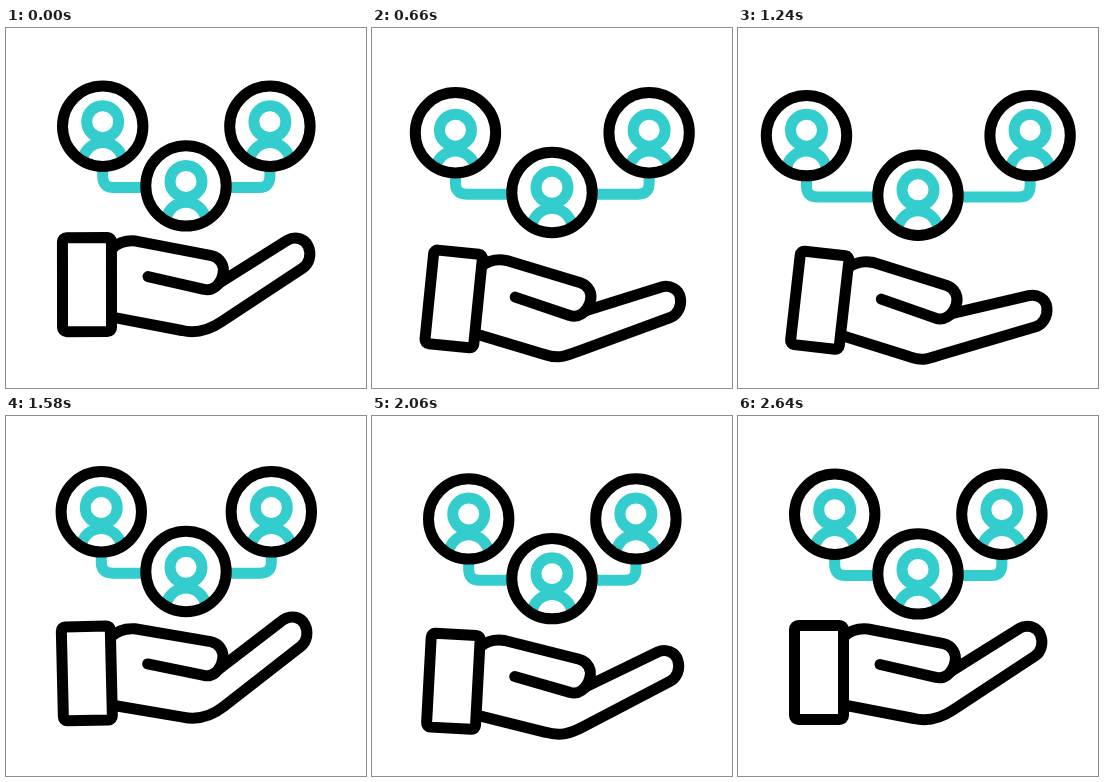
An HTML page for the animation above (3040 ms loop, 360 by 360 pixels).

```html
<!DOCTYPE html>
<html lang="en">
<head>
<meta charset="utf-8">
<title>Hand holding a network</title>
<style>
  html, body { margin: 0; width: 100%; height: 100%; overflow: hidden; background: #fff; }
  svg { display: block; width: 100%; height: 100%; }
  .ink, .teal { fill: none; stroke-width: 11; stroke-linecap: round; stroke-linejoin: round; }
  .ink { stroke: #000; }
  .teal { stroke: #33cdcd; }
</style>
</head>
<body>
<svg viewBox="0 0 360 360">
  <defs>
    <clipPath id="disc"><circle r="40"/></clipPath>
    <g id="person" class="teal">
      <circle r="16"/>
      <path d="M-22 60L-19.8 38A20 20 0 0 1 19.8 38L22 60"/>
    </g>
  </defs>
  <path id="links" class="teal" style="stroke-linecap:butt"/>
  <g id="nodes"></g>
  <g id="hand" class="ink">
    <rect x="56.5" y="209.5" width="49" height="94" rx="4"/>
    <path d="M106 220.5C112 215 120 212 130 213L205.5 227.7C214 229.5 219 237.5 217 246C214.5 257.5 206 263.5 198 261.3L142 248.5"/>
    <path id="finger"/>
  </g>
</svg>
<script>
const LOOP = 3040;
const $ = id => document.getElementById(id);

// The swing goes rest, up, down, hold, up, half down, rest.
const times = [0, 270, 1150, 1200, 1640, 2150, 2640];
const smooth = u => u * u * (3 - 2 * u);

// One quantity over the swing; the first fall is quickened by snap.
function swing(up, down, up2, down2, snap = 1.95) {
  const poses = [0, up, down, down, up2, down2, 0];
  return t => {
    if (t >= times[6]) return 0;
    const i = times.findIndex(end => end > t) - 1;
    let u = (t - times[i]) / (times[i + 1] - times[i]);
    if (i === 1) u = 1 - (1 - u) ** snap;
    return poses[i] + (poses[i + 1] - poses[i]) * smooth(u);
  };
}

const lift = swing(-3.3, 9.7, -3, 5.4);
const spread = swing(-6, 28.9, 0, 0, 1.3);
const tilt = swing(-1, 7.2, -1.4, 3.2);
const drop = swing(1.8, 17.2, 0.8, 9);
const bend = swing(-3, 10.8, -4, 3.2);
const HAND_LEAD = 40;

// A short dip of a head around the time mid.
const nod = (t, mid, depth) =>
  Math.abs(t - mid) < 160 ? depth * Math.cos((t - mid) / 320 * Math.PI) ** 2 : 0;

$('nodes').innerHTML = `<g>
  <g clip-path="url(#disc)"><use href="#person"/></g>
  <circle class="ink" r="40.2"/></g>`.repeat(3);
const nodes = [...$('nodes').children];

function place(node, x, y, head) {
  node.setAttribute('transform', `translate(${x} ${y})`);
  node.querySelector('use').setAttribute('y', head);
}

function fingerPath(deg) {
  const a = deg * Math.PI / 180, c = Math.cos(a), s = Math.sin(a);
  const p = (x, y) => {
    const u = x - 196, v = y - 257;
    return `${196 + u * c - v * s} ${257 + u * s + v * c} `;
  };
  return `M213.5 255L${p(281.5, 212.3)}`
    + `C${p(289, 208)}${p(299, 210.5)}${p(302.3, 218.5)}`
    + `C${p(306, 227)}${p(303, 236)}${p(297, 240)}`
    + `L${p(215, 294)}C${p(203, 302)}191 306 176 302.5L106 289`;
}

function draw(t) {
  const y = lift(t), side = 98.2 + y, mid = 157.9 + y, bar = mid + 1.7;
  const gap = 83.6 + spread(t), head = -4.5 - 0.1 * y;
  const sideHead = head + nod(t, 660, 2.5);
  place(nodes[0], 180.3 - gap, side, sideHead);
  place(nodes[1], 180.3 + gap, side, sideHead);
  place(nodes[2], 180, mid, head + nod(t, 340, 4.4));

  const link = d => {
    const x = 180.3 + d * gap;
    return `M${x} ${side + 40}V${bar - 11}Q${x} ${bar} ${x - d * 11} ${bar}H${180 + d * 40}`;
  };
  $('links').setAttribute('d', link(-1) + link(1));

  const lead = t + HAND_LEAD, angle = tilt(lead);
  $('hand').setAttribute('transform',
    `translate(${angle * 0.12} ${drop(lead)}) rotate(${angle} 81 256.5)`);
  $('finger').setAttribute('d', fingerPath(bend(t)));
}

const start = performance.now();
function tick() {
  // The hand is at rest again well before the loop ends.
  draw((performance.now() - start) % LOOP);
  requestAnimationFrame(tick);
}
tick();
</script>
</body>
</html>
```
